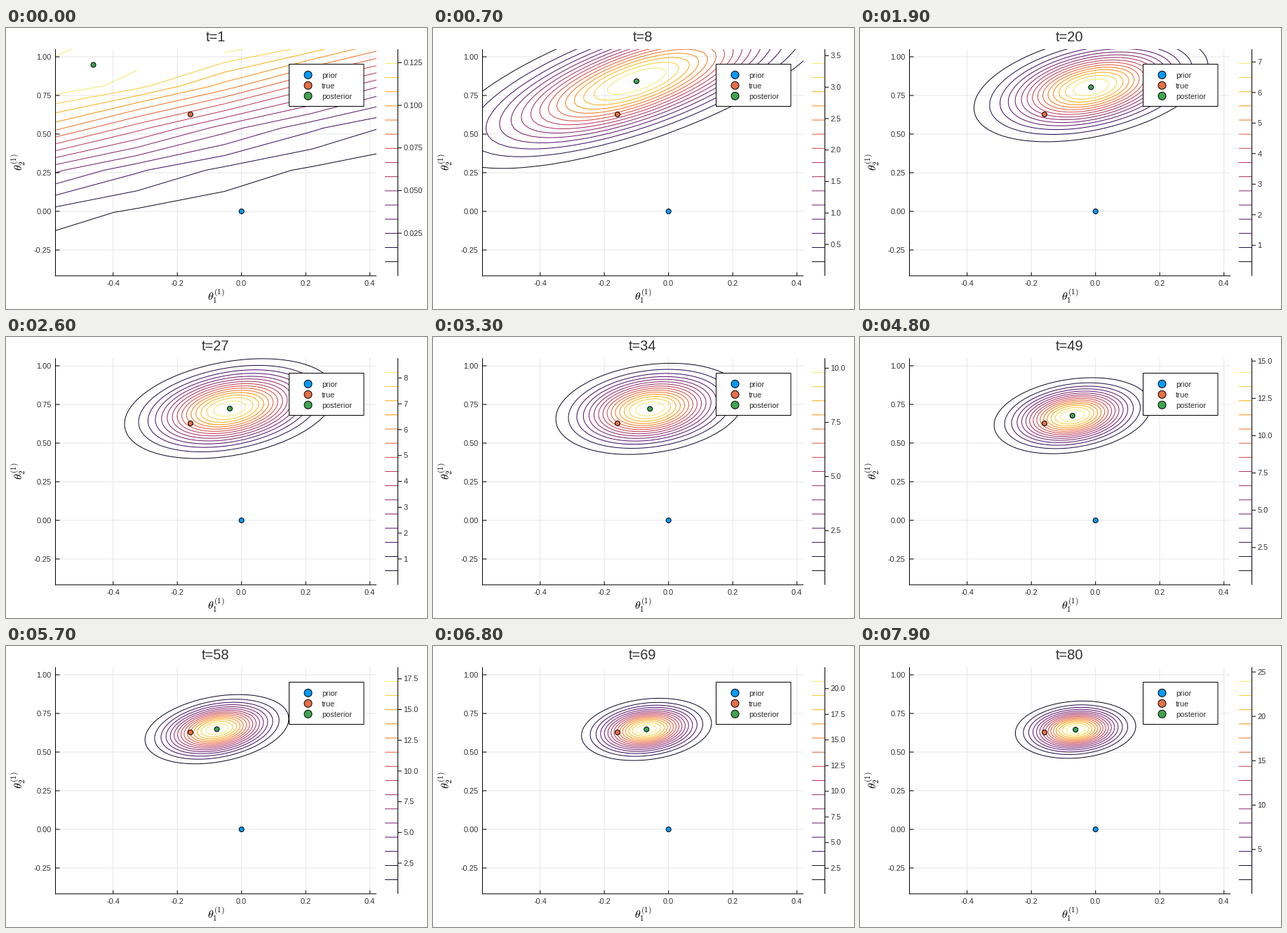
Animation, 600 px wide and 400 px high, one loop 8000 ms. Source, as a matplotlib script:

```python
import matplotlib.pyplot as plt
import numpy as np
from matplotlib.animation import FuncAnimation
from matplotlib.collections import LineCollection
from matplotlib.patches import Circle, Rectangle

plt.rcParams["font.family"] = ["Liberation Sans", "DejaVu Sans"]
plt.rcParams["mathtext.fontset"] = "cm"

PT = 0.72  # points per pixel at 100 dpi
STEPS = 80
LEFT, RIGHT, TOP, BOTTOM = 70.5, 528, 30.2, 352.8
BAR = 558.5
INK = "#303030"
BLUE, ORANGE, GREEN = "#009afa", "#e36f47", "#3ea44e"
LEVELS = np.arange(1, 16) / 16
SHADES = plt.get_cmap("inferno")(LEVELS)

# Key beliefs by t: mean x, mean y, sigma x, sigma y, correlation
BELIEFS = {
    1: (-0.4616, 0.948, 2.85, 1.443, 0.958),
    8: (-0.0999, 0.842, 0.256, 0.2393, 0.694),
    20: (-0.0140, 0.803, 0.1548, 0.1496, 0.38),
    27: (-0.0365, 0.723, 0.1392, 0.137, 0.31),
    40: (-0.0708, 0.7227, 0.1154, 0.1177, 0.165),
    58: (-0.0769, 0.648, 0.095, 0.0951, 0.302),
    80: (-0.0623, 0.645, 0.0796, 0.0787, 0.12),
}


def px(x):
    return 335.7 + 457.5 * x


def py(y):
    return 261 - 220 * y


def bar_y(share):
    return BOTTOM + (TOP - BOTTOM) * share


def information(mx, my, sx, sy, rho):
    """Precision matrix entries and precision-weighted mean."""
    cov = np.array([[sx * sx, rho * sx * sy], [rho * sx * sy, sy * sy]])
    prec = np.linalg.inv(cov)
    return np.concatenate([prec.ravel(), prec @ (mx, my)])


INFO = np.array([information(*b) for b in BELIEFS.values()])


def posterior(t):
    """Evidence adds up linearly between the key beliefs."""
    v = np.array([np.interp(t, list(BELIEFS), col) for col in INFO.T])
    prec = v[:4].reshape(2, 2)
    cov = np.linalg.inv(prec)
    return cov @ v[4:], cov, prec


def density(mean, cov, prec):
    reach = 4.737 * np.sqrt(cov.diagonal().max())
    d = np.linspace(-reach, reach, 100)
    dx, dy = np.meshgrid(d, d)
    m2 = prec[0, 0] * dx**2 + 2 * prec[0, 1] * dx * dy + prec[1, 1] * dy**2
    z = np.sqrt(np.linalg.det(prec)) / (2 * np.pi) * np.exp(-m2 / 2)
    return px(mean[0] + d), py(mean[1] + d), z


def tick_step(top):
    base = 10.0 ** (np.floor(np.log10(top)) - 1)
    return next(m * base for m in (1, 2.5, 5, 10, 25) if top < 10 * m * base)


def decimals(step):
    return next(n for n in range(9)
                if abs(step * 10**n - round(step * 10**n)) < 1e-6)


fig = plt.figure(figsize=(6, 4), dpi=100, facecolor="white")
ax = fig.add_axes([0, 0, 1, 1])
ax.set_xlim(0, 600)
ax.set_ylim(400, 0)
ax.set_autoscale_on(False)
ax.axis("off")


def line(xs, ys, color="black", z=4):
    ax.plot(xs, ys, color=color, lw=PT, zorder=z, snap=False,
            solid_capstyle="butt")


def label(x, y, s, size=11, ha="left", z=6):
    return ax.text(x, y, s, fontsize=size * PT, ha=ha, va="baseline",
                   color=INK, zorder=z)


def dot(x, y, color, size=7, z=5):
    return ax.add_patch(Circle((x, y), size / 2, fc=color, ec="black", lw=PT,
                               zorder=z))


def strokes(z):
    return ax.add_collection(LineCollection([], colors="black", snap=False,
                                            linewidths=PT, zorder=z))


# Axes and grid
for x in np.arange(-2, 3) / 5:
    line([px(x)] * 2, [TOP, BOTTOM], "#e6e6e6", 1)
    line([px(x)] * 2, [BOTTOM, BOTTOM - 5])
    label(px(x), 367, f"{x:.1f}", ha="center")
for y in np.arange(-1, 5) / 4:
    line([LEFT, RIGHT], [py(y)] * 2, "#e6e6e6", 1)
    line([LEFT, LEFT + 6], [py(y)] * 2)
    label(64.5, py(y) + 4, f"{y:.2f}", ha="right")
line([LEFT, LEFT], [TOP, BOTTOM + 0.5])
line([LEFT, RIGHT], [BOTTOM, BOTTOM])
for x, y, k, turn in ((299, 382, 1, 0), (17.5, 191, 2, 90)):
    ax.text(x, y, rf"$\theta_{k}^{{(1)}}$", fontsize=16 * PT, ha="center",
            va="center", rotation=turn)

# Colour bar
for level, shade in zip(LEVELS, SHADES):
    line([540, 558], [bar_y(level)] * 2, shade, 1)
line([BAR, BAR], [TOP, BOTTOM])
bar_ticks = strokes(4)
bar_labels = [label(566.5, 0, "") for _ in range(10)]

# Legend
ax.add_patch(Rectangle((403.5, 51.5), 106.5, 60, fc="white", ec="black",
                       lw=PT, zorder=7, snap=False))
entries = (("prior", BLUE), ("true", ORANGE), ("posterior", GREEN))
for k, (name, color) in enumerate(entries):
    dot(430.5, 66.8 + 15 * k, color, 11, 8)
    label(450, 70.8 + 15 * k, name, z=8)

# Moving parts
title = label(298.5, 19, "", size=20, ha="center")
rings = strokes(3)
rings.set_clip_path(Rectangle((LEFT, TOP), RIGHT - LEFT, BOTTOM - TOP,
                              transform=ax.transData))
dot(px(0), py(0), BLUE)
dot(px(-0.159), py(0.6275), ORANGE)
guess = dot(0, 0, GREEN)


def open_loops(segs):
    """Break rings where they cross a very long cell."""
    parts = []
    for seg in segs:
        gaps = np.hypot(*np.diff(seg, axis=0).T) > 100
        parts += np.split(seg, np.flatnonzero(gaps) + 1)
    return [p for p in parts if len(p) > 1]


def draw(i):
    mean, cov, prec = posterior(i + 1)
    gx, gy, z = density(mean, cov, prec)
    top = z.max()

    cs = ax.contour(gx, gy, z, levels=LEVELS * top)
    groups = [*cs.allsegs[:-1], open_loops(cs.allsegs[-1])]
    cs.remove()
    rings.set_segments([s for g in groups for s in g])
    rings.set_color([c for g, c in zip(groups, SHADES) for _ in g])

    step = tick_step(top)
    ticks = step * np.arange(1, int(top / step) + 1)
    bar_ticks.set_segments([[(BAR, y), (564, y)] for y in bar_y(ticks / top)])
    for text in bar_labels:
        text.set_text("")
    for text, v in zip(bar_labels, ticks):
        text.set_text(f"{v:.{decimals(step)}f}")
        text.set_y(bar_y(v / top) + 3.7)

    guess.set_center((px(mean[0]), py(mean[1])))
    title.set_text(f"t={i + 1}")
    return [rings, bar_ticks, guess, title, *bar_labels]


anim = FuncAnimation(fig, draw, frames=STEPS, interval=100, repeat=True,
                     init_func=lambda: [])
plt.show()
```
